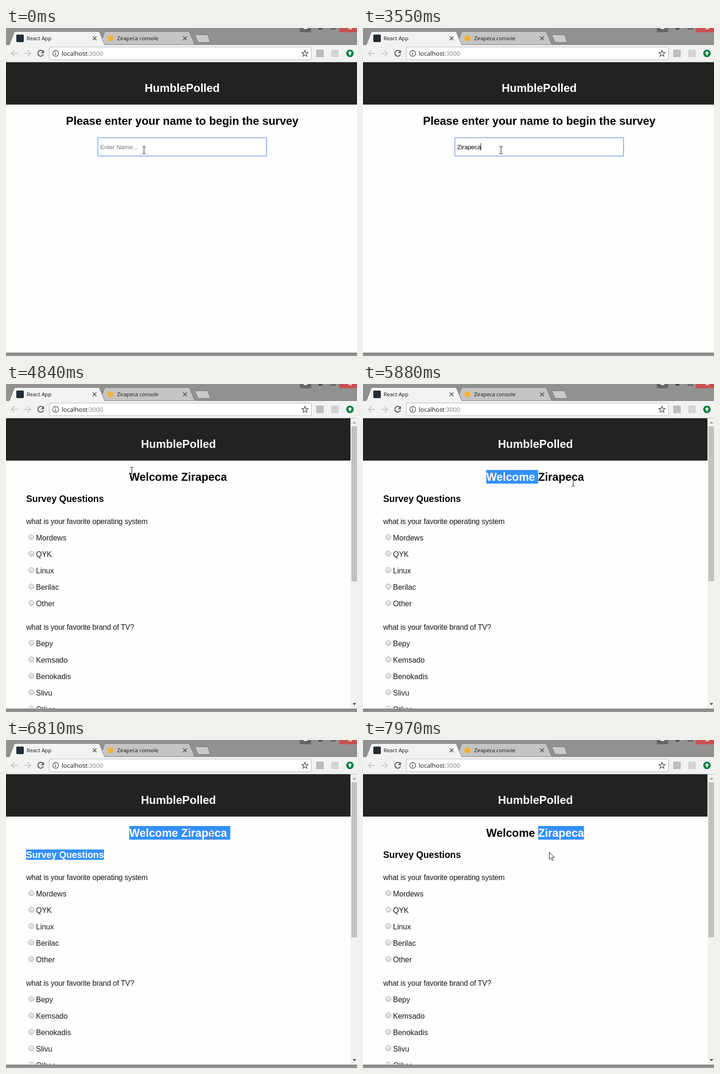
These frames come from a looping animation (749 px wide and 698 px high, 8 s). An HTML page:

```html
<!DOCTYPE html>
<html lang="en">
<head>
<meta charset="utf-8">
<title>Survey</title>
<style>
  html, body { margin: 0; width: 100%; height: 100%; overflow: hidden; background: #fefefe; }
  svg { display: block; font-family: "Liberation Sans", Arial, sans-serif; }
  .ui { font-family: "Open Sans", "Noto Sans", sans-serif; font-size: 11.3px; fill: #111; }
  .url { font-size: 13.1px; }
  .h { font-size: 24px; font-weight: bold; }
  .welcome { font-size: 23.8px; }
  .mid { text-anchor: middle; }
  #list text { font-size: 16px; fill: #1a1a1a; }
  #list .q { letter-spacing: -.25px; }
  .sel { fill: #3390ff; }
  #beam { fill: #fff; mix-blend-mode: difference; }
</style>
</head>
<body>
<svg width="749" height="698" viewBox="0 0 749 698">
  <defs>
    <linearGradient id="knob" x2="0" y2="1">
      <stop stop-color="#f0f0f0"/><stop offset="1" stop-color="#d8d8d8"/>
    </linearGradient>
    <g id="radio"><circle r="5.5" fill="url(#knob)" stroke="#a0a0a0"/></g>
    <path id="cross" d="M-4-4L4 4M4-4L-4 4" fill="none" stroke="#4a4a4a" stroke-width="1.6"/>
    <path id="back" d="M7 0H-6M0-6.5L-6.5 0L0 6.5" fill="none" stroke="#c6c6c6" stroke-width="1.8"/>
  </defs>

  <!-- page -->
  <rect width="749" height="698" fill="#fefefe"/>
  <rect y="73" width="749" height="90" fill="#222"/>
  <text id="brand" class="h mid" y="136" fill="#fff">HumblePolled</text>

  <g id="login">
    <text class="h" x="128" y="206">Please enter your name to begin the survey</text>
    <rect x="196" y="233.5" width="360" height="39" rx="1.5" fill="#fff" stroke="#8fb3f1" stroke-width="2"/>
    <text id="entry" x="201" y="258" font-size="13"></text>
    <rect id="caret" y="245" width="1" height="16"/>
  </g>

  <g id="survey">
    <rect id="selTop" class="sel" y="183" height="29"/>
    <rect id="selSub" class="sel" x="43" y="233" width="166" height="22"/>
    <text class="h welcome" x="263" y="206"><tspan id="hello">Welcome </tspan><tspan id="who"></tspan></text>
    <text id="sub" x="43" y="251" font-size="19.5" font-weight="bold">Survey Questions</text>
    <g id="list"></g>
    <rect x="735" y="73" width="14" height="618" fill="#f1f1f1"/>
    <rect x="737" y="90" width="12" height="330" fill="#c1c1c1"/>
    <path d="M739.5 84h8l-4-4.5z" fill="#a3a3a3"/>
    <path d="M739.5 679h8l-4 4.5z" fill="#505050"/>
  </g>

  <!-- window frame -->
  <rect y="690" width="749" height="1" fill="#fefefe"/>
  <rect y="691" width="749" height="1" fill="#5e5e5e"/>
  <rect y="692" width="749" height="6" fill="#919191"/>
  <rect width="749" height="36" fill="#919191"/>
  <rect x="627" width="24" height="9" fill="#656565"/>
  <rect x="635" width="8" height="2" fill="#fff"/>
  <rect x="667" y="1" width="8" height="2" fill="#222"/>
  <path d="M693.5 0V2.5H702.5V0" fill="none" stroke="#222"/>
  <rect x="711" width="38" height="9" fill="#c75050"/>
  <path d="M731 3L734.5-.5L738 3" fill="none" stroke="#fff" stroke-width="1.6"/>

  <!-- tabs -->
  <path d="M200 36L210 10Q211 7.5 213 7.5H389Q391 7.5 392 10L403 36z" fill="#c4c4c4" stroke="#777"/>
  <path d="M405 14.5H428Q430 14.5 431 16.5L435.5 29Q436 30.5 434 30.5H412Q410 30.5 409 28.5L404 17Q403 14.5 405 14.5z" fill="#c9c9c9" stroke="#777"/>
  <rect y="35" width="749" height="1" fill="#7b7b7b"/>
  <path d="M7 36.5L17 10Q18 7.5 20 7.5H197Q199 7.5 200 10L211 36.5" fill="#f2f2f2" stroke="#7b7b7b"/>
  <rect x="22" y="14" width="16" height="16" rx="2" fill="#222c31"/>
  <text class="ui" x="44" y="26">React App</text>
  <use href="#cross" x="189" y="22"/>
  <circle cx="223" cy="22" r="6.5" fill="#f5b13a"/>
  <text class="ui" x="237" y="26">Zirapeca console</text>
  <use href="#cross" x="382" y="22"/>

  <!-- toolbar -->
  <rect y="36" width="749" height="37" fill="#f2f2f2"/>
  <rect y="72" width="749" height="1" fill="#b6b6b6"/>
  <use href="#back" x="18" y="54"/>
  <use href="#back" transform="translate(46 54) scale(-1 1)"/>
  <path d="M79.5 50.5A6.2 6.2 0 1 0 80 56" fill="none" stroke="#555" stroke-width="2"/>
  <path d="M81 47V53.5H74.5z" fill="#555"/>
  <rect x="92.5" y="40.5" width="559" height="27" rx="2.5" fill="#fff" stroke="#b4b4b4"/>
  <circle cx="106" cy="54" r="6.3" fill="none" stroke="#555" stroke-width="1.4"/>
  <path d="M106 53V58M106 50V51.7" stroke="#555" stroke-width="1.6"/>
  <text class="ui url" x="119" y="59">localhost<tspan fill="#808080">:3000</tspan></text>
  <path id="star" fill="none" stroke="#555" stroke-width="1.4"/>
  <rect x="662" y="46" width="16" height="16" fill="#bcbcbc"/>
  <rect x="694" y="46" width="16" height="16" rx="2" fill="#d3d3d3"/>
  <circle cx="734" cy="54" r="8" fill="#0b8043"/>
  <path d="M734 49L738.5 54H735.5V58H732.5V54H729.5z" fill="#fff"/>

  <!-- pointers -->
  <path id="beam" d="M-3.5-8h3v1h1v-1h3v1h-3v14h3v1h-3v-1h-1v1h-3v-1h3v-14h-3z"/>
  <path id="arrow" d="M.5.5V16L4 12.7L6.5 18.3L9 17.2L6.6 11.7H11.3z" fill="#fff" stroke="#111"/>
</svg>
<script>
const LOOP = 8000, TICK = 120, BLINK = 500;
const NAME = 'Zirapeca';
const KEYS = [150, 1200, 1330, 1480, 1980, 2130, 2260, 2530];
const SURVEY = 3700, PRESS = 5730, CLEAR = 7180, DOUBLE = 7330;
const HEADING = { x: 263, top: 183, bottom: 212 };

// pointer glides: start, number of ticks, end point
const GLIDES = [
  [4450, 1, 277, 202],
  [4600, 2, 269, 167],
  [4840, 3, 268, 189],
  [PRESS, 1, 275, 189],
  [5880, 1, 448, 210],
  [6030, 1, 507, 223],
  [6310, 1, 513, 233],
  [6450, 4, 437, 203],
  [7970, 1, 397, 238]
];

const QUESTIONS = [
  ['what is your favorite operating system', 'Mordews', 'QYK', 'Linux', 'Berilac', 'Other'],
  ['what is your favorite brand of TV?', 'Bepy', 'Kemsado', 'Benokadis', 'Slivu', 'Other']
];

const $ = id => document.getElementById(id);
const set = (id, attrs) => Object.entries(attrs).forEach(([k, v]) => $(id).setAttribute(k, v));
const show = (id, on) => { $(id).style.display = on ? '' : 'none'; };
const ink = (id, on) => set(id, { fill: on ? '#fff' : '#000' });
const ease = p => 1 - (1 - p) ** 4;

function build() {
  $('who').textContent = NAME;
  $('list').innerHTML = QUESTIONS.map(([title, ...options], n) => {
    const y = 298 + 225 * n;
    return `<text class="q" x="43" y="${y}">${title}</text>` + options.map((label, i) => {
      const base = y + 35 * (i + 1);
      return `<use href="#radio" x="54" y="${base - 7}"/><text x="64" y="${base}">${label}</text>`;
    }).join('');
  }).join('');

  const points = Array.from({ length: 10 }, (_, i) => {
    const r = i % 2 ? 3 : 7, a = i * Math.PI / 5;
    return [638 + r * Math.sin(a), 54.5 - r * Math.cos(a)];
  });
  set('star', { d: `M${points.join('L')}z` });
}

function drawLogin(t) {
  const pressed = KEYS.filter(k => t >= k);
  const typed = pressed.length;
  $('entry').textContent = typed ? NAME.slice(0, typed) : 'Enter Name...';
  set('entry', { fill: typed ? '#000' : '#757575' });
  set('caret', { x: 201 + Math.floor($('entry').getComputedTextLength()) });
  show('caret', typed && Math.floor((t - pressed[typed - 1]) / BLINK) % 2 === 0);
}

function drawSelection(t) {
  const first = t >= 5880 && t < CLEAR;
  const all = first && t >= 6030;
  const second = all || t >= DOUBLE;
  const split = HEADING.x + $('hello').getComputedTextLength();
  const end = split + $('who').getComputedTextLength() + (all ? 7 : 0);
  const from = first ? HEADING.x : split;
  set('selTop', { x: from, width: (second ? end : split) - from });
  show('selTop', first || second);
  show('selSub', all);
  ink('sub', all);
  ink('hello', first);
  ink('who', second);
}

function pointerAt(t) {
  let x = 294, y = 260;
  for (const [start, ticks, toX, toY] of GLIDES) {
    if (t < start) break;
    const p = ease(Math.min(1, (Math.floor((t - start) / TICK) + 1) / ticks));
    x += (toX - x) * p;
    y += (toY - y) * p;
  }
  return [Math.round(x), Math.round(y)];
}

function drawPointer(t) {
  const [x, y] = pointerAt(t);
  const dragging = t >= PRESS && t < CLEAR;
  const overText = y >= HEADING.top && y <= HEADING.bottom;
  const beam = t < SURVEY || dragging || overText;
  show('beam', beam);
  show('arrow', !beam);
  set('beam', { transform: `translate(${x + .5} ${y})` });
  set('arrow', { transform: `translate(${x} ${y})` });
}

function render(t) {
  const survey = t >= SURVEY;
  show('login', !survey);
  show('survey', survey);
  set('brand', { x: survey ? 368 : 376 });
  if (survey) drawSelection(t);
  else drawLogin(t);
  drawPointer(t);
}

build();
render(0);
let start;
function tick(now) {
  start ??= now;
  render((now - start) % LOOP);
  requestAnimationFrame(tick);
}
requestAnimationFrame(tick);
</script>
</body>
</html>
```
